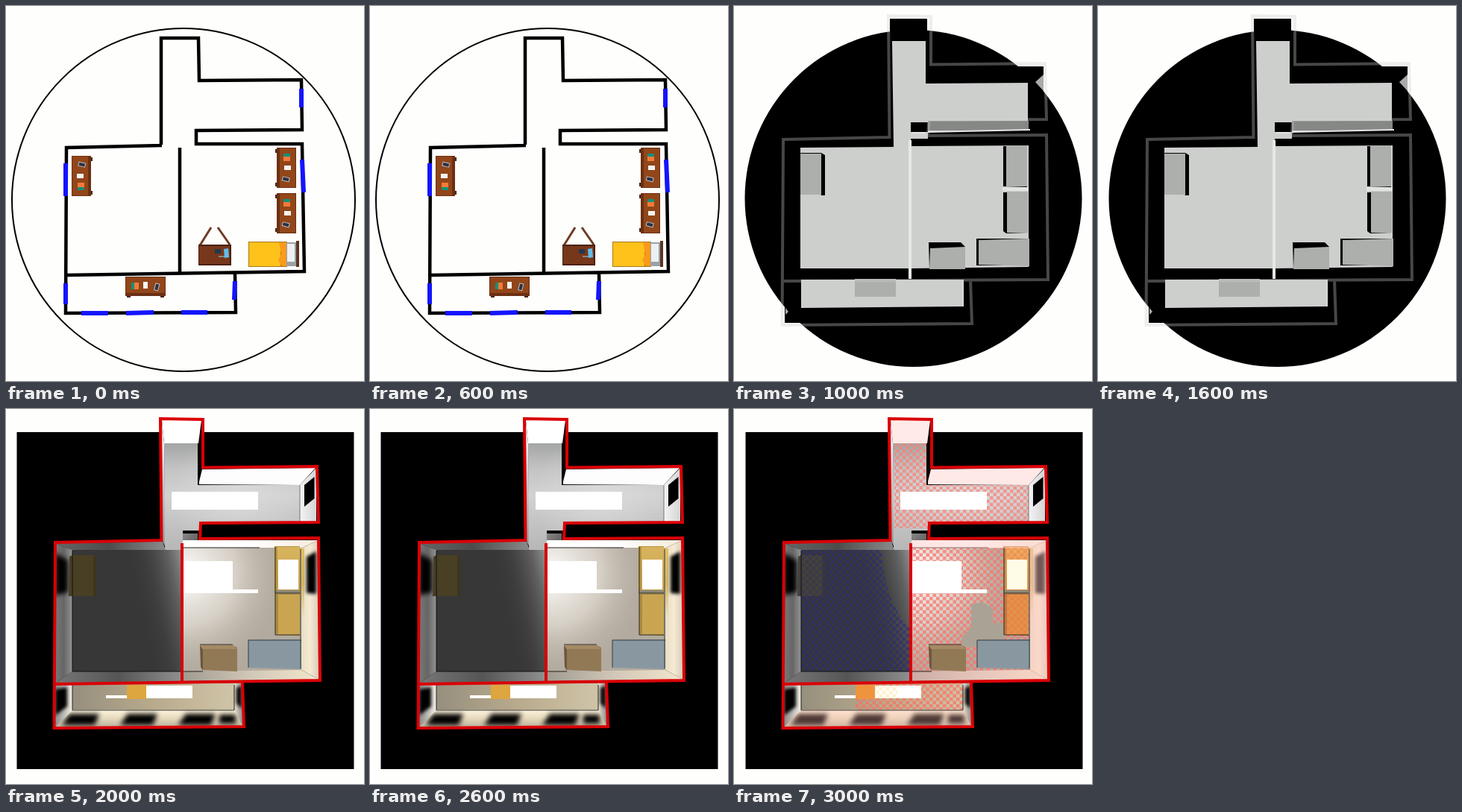
Recreate the animation shown at these times as an HTML page with a canvas. Size 480 px wide and 503 px high, loop 4000 ms.

```html
<!DOCTYPE html>
<html>
<head>
<meta charset="utf-8">
<title>Apartment plan</title>
<style>
html, body { margin: 0; width: 100%; height: 100%; overflow: hidden; background: #fefefc; }
canvas { display: block; }
</style>
</head>
<body>
<canvas id="stage" width="480" height="503"></canvas>
<script>
const c = document.getElementById('stage').getContext('2d');
const OUTLINE = 'M209 176L66 179L64.5 428L319 426L317 367M65 369L421 364L419 173L260 174L261 153L419 152L417 77L264 78.5L264 14L207 13L208.5 178';

function box(color, x0, y0, x1, y1) {
  c.fillStyle = color;
  c.fillRect(x0, y0, x1 - x0, y1 - y0);
}
function poly(color, path) {
  c.fillStyle = color;
  c.fill(new Path2D('M' + path + 'Z'));
}
function line(color, width, path) {
  c.strokeStyle = color;
  c.lineWidth = width;
  c.stroke(new Path2D(path));
}
function disc(color, x, y, r) {
  c.fillStyle = color;
  c.beginPath();
  c.arc(x, y, r, 0, 7);
  c.fill();
}
function stops(g, colors) {
  colors.forEach((k, i) => g.addColorStop(i / (colors.length - 1), k));
  return g;
}
const lin = (x0, y0, x1, y1, ...k) => stops(c.createLinearGradient(x0, y0, x1, y1), k);
const rad = (x, y, r, ...k) => stops(c.createRadialGradient(x, y, 0, x, y, r), k);

function blurred(px, draw) {
  c.save();
  c.filter = `blur(${px}px)`;
  draw();
  c.restore();
}
function clipped(path, draw) {
  c.save();
  c.clip(new Path2D('M' + path + 'Z'));
  draw();
  c.restore();
}
// Checkerboard with 4.5 px cells
function checks(color) {
  const tile = document.createElement('canvas');
  tile.width = tile.height = 18;
  const t = tile.getContext('2d');
  t.fillStyle = color;
  t.fillRect(0, 0, 9, 9);
  t.fillRect(9, 9, 9, 9);
  const p = c.createPattern(tile, 'repeat');
  p.setTransform(new DOMMatrix().scale(0.5));
  return p;
}

function desk(x, y, angle) {
  c.save();
  c.translate(x, y);
  c.rotate(angle);
  box('#4a2512', -25, 11, -20, 15);
  box('#4a2512', 20, 11, 25, 15);
  box('#6b3014', -27, -13, 27, 13);
  box('#924619', -26, -12, 26, 9);
  box('#159078', -19, -5, -15, 4);
  box('#f47a38', -15, -5, -9, 4);
  box('#f4f4f4', -3, -6, 3, 3);
  c.rotate(0.25);
  box('#b9bfc8', 12, -8, 18, 2);
  box('#2c3040', 13, -7, 17, 1);
  c.restore();
}

function plan() {
  c.strokeStyle = '#000';
  c.lineWidth = 2;
  c.beginPath();
  c.arc(238, 260, 230, 0, 7);
  c.stroke();
  line('#000', 4.5, 'M209 187L81 190L80 412L308 411L307 358M80 361L400 356L397 185L255 185L255 167L397 166L396 99L259 100L258 43L208 43L208 186M233 190V358');
  line('#1414ff', 6, 'M80 211V255M80 372V400M101 412H137M161 412L198 411M235 411H270M307 369L306 394M396 111V136M397 206L399 250');
  desk(101, 228, -Math.PI / 2);
  desk(376, 217, Math.PI / 2);
  desk(376, 278, Math.PI / 2);
  desk(187, 376, 0);

  box('#a87820', 325, 316, 377, 350);
  box('#ffc21a', 326, 317, 368, 349);
  poly('#f99a1c', '366 317H377V349H370L365 341L369 333Z');
  box('#9aa2a8', 376, 317, 390, 349);
  box('#edf0f2', 377, 319, 387, 343);
  box('#5c3420', 389, 315, 393, 350);

  line('#6e3b24', 3, 'M260 321L275 297M300 320L284 297');
  box('#4b2010', 258, 320, 302, 348);
  box('#76371a', 259, 322, 300, 346);
  box('#22384a', 280, 326, 288, 332);
  poly('#62bce8', '292 326L298 325L299 337L293 338Z');
  line('#9fd4f0', 1, 'M285 336H293');
}

function massing() {
  disc('#000', 240.5, 258, 226);
  poly('#000', '209 17H259V81H415V151H260V177H418V366H316V425H68V181H209');
  poly('#cdcfcd', '212 47H257V104L394 103V166L260 169V178H237V188L395 187V350L237 352H89V190L214 189');
  poly('#cdcfcd', '90 367H308V403L90 405');
  box('#868886', 260, 154, 395, 167);
  box('#000', 237, 156, 260, 169);
  line('#e4e6e4', 2, 'M238 170H257M260 169L397 166');
  box('#000', 238, 178, 395, 187);
  poly('#a9aba9', '404 102L415 92V114');
  poly('#a9aba9', '69 405L73 410L69 414');

  const top = '#adafad';
  poly('#000', '89 197H117L122 200V254H117');
  box(top, 89, 198, 117, 253);
  poly('#000', '361 188H393V243L361 242');
  box(top, 365, 187, 393, 242);
  box('#e2e4e2', 360, 243, 395, 248);
  poly('#000', '361 250L394 249V304L365 305L361 302');
  box(top, 366, 249, 394, 304);
  box('#000', 325, 312, 396, 348);
  poly(top, '328 314L396 312V349L328 347');
  poly('#000', '261 317H304L310 323V353H262');
  poly(top, '263 325L310 323V353H262');
  box(top, 162, 366, 217, 390);

  line('rgba(205,207,205,.34)', 4, OUTLINE.replace('421 364', '421 367'));
  line('#e6e8e6', 4, 'M236 180V366');
  line('#d8dad8', 2, 'M307 370V403');
}

function hall(warm) {
  poly('#000', '208 15H263V79H417V153H260V186H213L209 177');
  poly('#fff', '209 15H262L258 46H212');
  poly(lin(0, 46, 0, 185, '#eee', '#bbb', '#999'), '209 16L212 46L214 185L209 177');
  const floor = '212 46H257V102H394V151H260V165H237V190H213';
  poly(lin(0, 46, 0, 185, '#a4a5a5', '#c4c4c4', '#d2d2d2', '#c4c4c4', '#b8b8b8'), floor);
  poly(rad(310, 118, 90, 'rgba(225,225,225,.6)', 'rgba(225,225,225,0)'), floor);
  poly('#fdfdfd', '263 81L415 79L394 102L258 101');
  poly(lin(394, 0, 416, 0, '#f4f4f4', '#d4d4d4'), '394 102L416 79V151H394');
  if (warm) {
    const pink = 'rgba(255,195,190,.35)';
    poly(pink, '209 15H262L258 46H212');
    poly(pink, '263 81L415 79L394 102L258 101');
    poly(checks('rgba(255,125,115,.7)'), '214 46H257V102H394V151H260V160H214');
  }
  blurred(0.5, () => poly('#000', '400 102L413.5 91V120L400 131'));
  line('#000', 2, 'M259 48L258 101M262 50V78');
  line('#777', 1, 'M394 102V151');
  box('#fff', 222, 111, 338, 135);
  box('#000', 237, 163, 259, 167);
  poly(lin(237, 167, 257, 185, '#888', '#555'), '237 167H257V184L237 186');
  line('#000', 3, 'M208 176L212 186');
}

function darkRoom(cold) {
  clipped('66 180L210 177L214 189H236V366L66 368', () => {
    poly(lin(66, 0, 210, 0, '#666', '#4c4c4c', '#888'), '66 180L210 177L214 189H89');
    box('#373737', 89, 189, 236, 352);
    box(lin(245, 188, 160, 208, 'rgba(185,185,185,.95)', 'rgba(125,125,125,.6)', 'rgba(80,80,80,.3)', 'rgba(55,55,55,0)'), 89, 189, 236, 352);
    if (cold) poly(checks('rgba(42,42,125,.6)'), '89 189H197C201 244 214 271 235 294V352H89');
    poly(lin(66, 0, 89, 0, '#777', '#666', '#949494'), '66 180L89 189V352L66 368');
    blurred(3, () => poly('#000', '66 193L83 203V246L66 250'));
    poly(lin(66, 0, 236, 0, '#777', '#555', '#909090'), '66 368L89 352H236V366');
    poly(cold ? '#44413c' : '#493f25', '89 196H117L121 200V251H84L85 198');
    poly(cold ? '#39383b' : '#3d351f', '117 197L121 200V251H117');
    if (cold) box(checks('rgba(42,42,100,.3)'), 89, 196, 121, 251);
    line('#111', 1, 'M89 352H236M89 190V352');
  });
}

function brightRoom(warm) {
  poly(lin(238, 0, 420, 0, '#fff', '#fff', '#f4ead8'), '237 176H419L395 187H237');
  box('#b2aa9e', 238, 186, 396, 352);
  box(rad(240, 222, 140, '#fff', 'rgba(225,219,210,.75)', 'rgba(178,170,158,0)'), 238, 186, 396, 352);
  if (warm) {
    poly(checks('rgba(255,112,105,.72)'), '238 186H396V352H238');
    poly('#aaa294', '317 262L332 259L346 268V287H361V312H326V319H304V308L317 292');
  }
  line('#222', 1, 'M238 186H340');
  box('#fff', 238, 204, 304, 247);
  box('#fff', 304, 242, 338, 247);

  const gold = warm ? '#df954c' : '#c9a552';
  poly(warm ? '#c98f50' : '#b79545', '360 184H394V246L360 243');
  box(lin(0, 184, 0, 245, warm ? '#ecad63' : '#d8b45e', gold), 364, 185, 394, 244);
  box(warm ? '#fffbe6' : '#fff', 365, 202, 392, 242);
  box('#8d8876', 360, 243, 394, 247);
  poly(warm ? '#b87842' : '#a98a40', '361 248H394V304L361 302');
  box(gold, 365, 249, 394, 303);
  if (warm) {
    const tint = checks('rgba(255,100,55,.35)');
    box(tint, 362, 185, 394, 202);
    box(tint, 362, 249, 394, 303);
  }
  line('#302814', 1, 'M361 247H394M361 185V303M361 303H394');

  poly(lin(395, 0, 420, 0, '#e8dcc0', '#f6ead4', '#d6cbb8'), '395 187L419 176L420 363L396 350');
  box(lin(0, 187, 0, 280, '#e6be60', '#d8b860', 'rgba(216,184,96,0)'), 395, 187, 400, 280);
  blurred(2, () => poly('#000', '403 198L416 191V248L403 247'));
  poly(lin(237, 0, 420, 0, '#a09a90', '#d2c8b8', '#f4e6cc'), '237 352L396 350L420 363L237 365');
  if (warm) {
    poly('rgba(255,200,195,.45)', '237 176H419L395 187H237');
    poly('rgba(255,195,190,.45)', '395 187L419 176L420 363L237 365V352L396 350');
  }
  poly('#8998a0', '325 310L396 309V349L325 347');
  line('#303a40', 1, 'M325 347V310H396M395 188V348');
  poly('#927956', '260 317H304L310 320V352L264 350');
  poly('#6d573d', '260 317L264 323V351L261 346');
  poly('#a58a65', '260 317H304L310 322H264');
  line('#2c2116', 1, 'M260 316H304M237 352H264');
}

function balcony(warm) {
  clipped('66 370L317 367V426L66 427', () => {
    box('#d8cdb8', 66, 367, 318, 428);
    box(lin(89, 0, 306, 0, '#968f7e', '#b8aa8c', '#d0c4a8'), 89, 368, 306, 404);
    if (warm) box(checks('rgba(255,112,95,.75)'), 162, 368, 306, 403);
    poly(lin(0, 403, 0, 427, '#fff6e0', '#e6d9bc', '#b8ae9c'), '89 403H306L318 427H66');
    blurred(3, () => {
      for (const x of [79, 157, 235]) poly('#000', `${x + 6} 409H${x + 46}L${x + 40} 424H${x - 4}`);
      box('#000', 286, 410, 308, 422);
    });
    poly(lin(66, 0, 89, 0, '#888', '#f4f0e6'), '66 370L89 368V404L66 427');
    poly(lin(306, 0, 318, 0, '#e8dfcc', '#888'), '306 368H318V427L306 403');
    if (warm) poly('rgba(255,185,175,.3)', '66 427L89 403H306L318 427');
    blurred(2, () => {
      poly('#000', '66 376L82 373V399L66 411');
      poly('#000', '309 374L316 371V402L309 395');
    });
    line('#222', 1, 'M89 370V404H306V370');
    box('#fff', 134, 384, 162, 388);
    box(warm ? '#ef943e' : '#dda63e', 162, 370, 188, 389);
    box('#fff', 188, 371, 250, 388);
    if (warm) box(checks('rgba(255,210,90,.3)'), 188, 371, 218, 388);
  });
}

function render(thermal) {
  c.save();
  if (thermal) c.translate(1, 0);
  box('#000', 14.5, 31, 466.5, 483);
  hall(thermal);
  darkRoom(thermal);
  brightRoom(thermal);
  balcony(thermal);
  line('#d90006', 4, OUTLINE + 'M236 180V365');
  c.restore();
}

const scenes = [plan, massing, () => render(false), () => render(true)];
let shown = -1;
function tick() {
  const i = Math.floor(performance.now() / 1000) % 4;
  if (i !== shown) {
    shown = i;
    box('#fefefc', 0, 0, 480, 503);
    scenes[i]();
  }
  requestAnimationFrame(tick);
}
tick();
</script>
</body>
</html>
```
